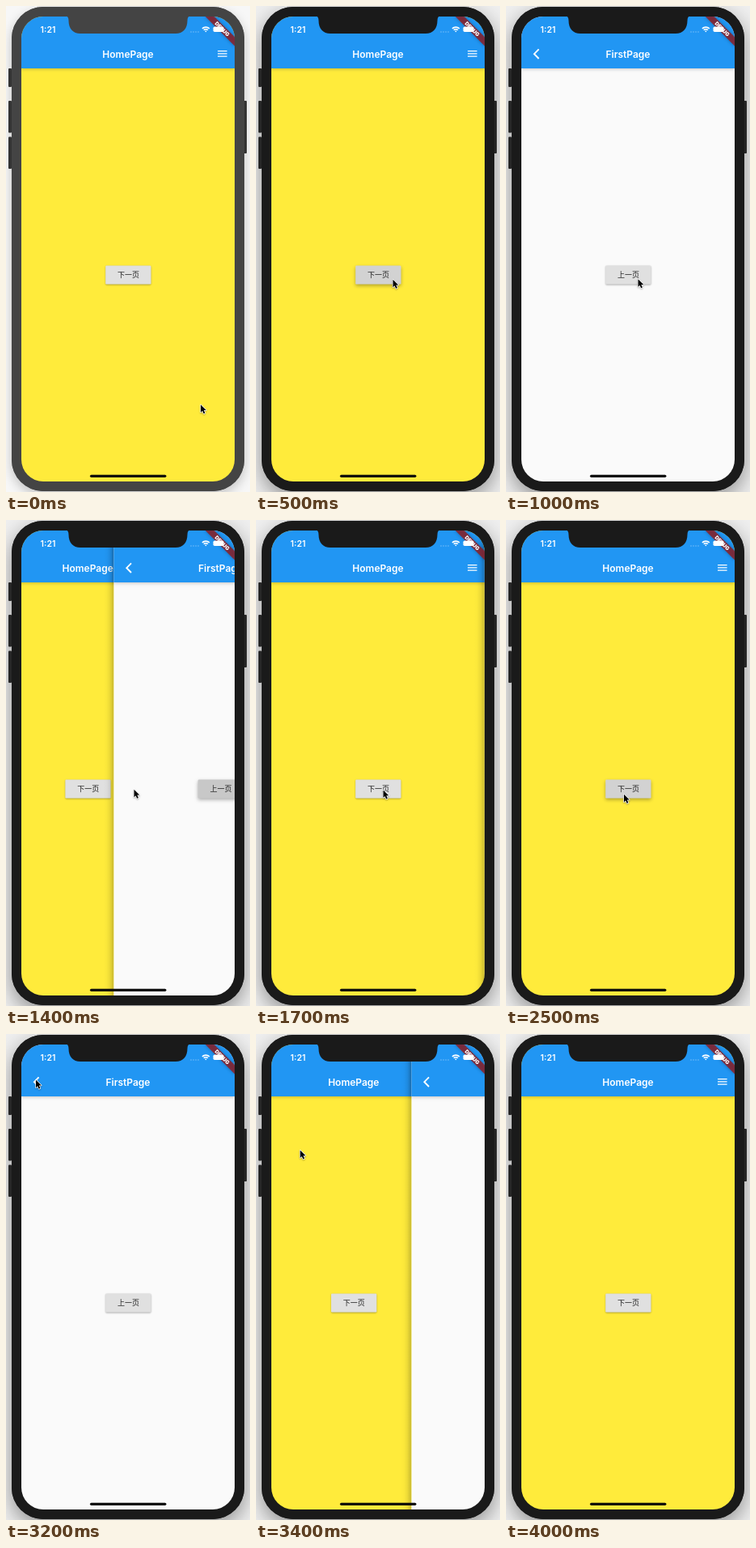
These frames come from a looping animation (302 px wide and 600 px high, 4.1 s). An HTML page with a canvas:

```html
<!DOCTYPE html>
<html lang="zh">
<head>
<meta charset="utf-8">
<style>
  html, body { margin: 0; width: 302px; height: 600px; overflow: hidden; }
  canvas { display: block; }
</style>
</head>
<body>
<canvas id="stage" width="302" height="600"></canvas>
<script>
const g = document.getElementById('stage').getContext('2d');
const LOOP = 4100, STEP = 100, SLIDE = 400;
const SCREEN = { x: 19, y: 13, w: 264, h: 574, r: 27 };
const UI = 'Inter, sans-serif', CJK = '"Noto Sans CJK SC", "Noto Sans CJK", sans-serif';

// Cursor waypoints: time, x, y
const CURSOR = [
  [0, 241, 492.3], [100, 236, 478], [350, 169.5, 337.8], [600, 169.5, 337.8],
  [900, 163.5, 337.3], [1200, 163.5, 337.3], [1400, 158.5, 332.8], [1700, 157.5, 333.5],
  [2200, 146, 338.8], [2700, 146, 338.8], [3100, 37, 56.8], [3300, 37, 56.8],
  [3700, 150, 612]
];
// Start of each slide and whether it opens the second page
const SLIDES = [[560, true], [1331, false], [2535, true], [3280, false]];

const easeOut = p => 1 - (1 - p) ** 3;
const between = (t, a, b) => t >= a && t < b;

function cursorAt(t) {
  const i = CURSOR.findIndex(k => k[0] > t);
  if (i < 0) return null;
  const [t0, x0, y0] = CURSOR[i - 1], [t1, x1, y1] = CURSOR[i];
  const p = (t - t0) / (t1 - t0), e = p * p * (3 - 2 * p);
  return [x0 + (x1 - x0) * e, y0 + (y1 - y0) * e];
}

function pageShown(t) {
  let shown = 0;
  for (const [start, opens] of SLIDES) {
    if (t < start) break;
    const e = easeOut(Math.min(1, (t - start) / SLIDE));
    shown = opens ? e : 1 - e;
  }
  return shown;
}

function box(x, y, w, h, r, color) {
  g.fillStyle = color;
  g.beginPath();
  g.roundRect(x, y, w, h, r);
  g.fill();
}

function shadow(color, blur, dy, draw) {
  g.save();
  g.shadowColor = color;
  g.shadowBlur = blur;
  g.shadowOffsetY = dy;
  draw();
  g.restore();
}

function label(text, x, y, font, color = '#fff') {
  g.font = font;
  g.fillStyle = color;
  g.textAlign = 'center';
  g.fillText(text, x, y);
}

function line(points, width) {
  g.strokeStyle = '#fff';
  g.lineWidth = width;
  g.beginPath();
  points.forEach(([x, y]) => g.lineTo(x, y));
  g.stroke();
}

function page(color, title, caption, pressed) {
  g.fillStyle = color;
  g.fillRect(SCREEN.x, SCREEN.y, SCREEN.w, SCREEN.h);
  shadow('rgba(0,0,0,.22)', 4, 1, () => box(19, 13, 264, 64, 0, '#2196f3'));
  label(title, 151, 63.5, '600 12px ' + UI);
  shadow('rgba(0,0,0,.3)', pressed ? 4 : 2, pressed ? 2 : .8,
    () => box(123.2, 320.4, 56.3, 23.2, 1.3, pressed || '#e0e0e0'));
  label(caption, 151.5, 335.3, '9px ' + CJK, '#212121');
}

function homePage(pressed) {
  page('#ffeb3b', 'HomePage', '下一页', pressed);
  for (const y of [55.7, 58.9, 62.1]) line([[262, y], [273.6, y]], 1.3);
}

function firstPage(pressed) {
  page('#fafafa', 'FirstPage', '上一页', pressed);
  line([[40.6, 53.4], [34.9, 59.2], [40.6, 65]], 1.9);
}

function edgeShadow() {
  const fade = g.createLinearGradient(6, 0, 19, 0);
  [[0, 0], [.3, .016], [.6, .07], [1, .22]]
    .forEach(([at, alpha]) => fade.addColorStop(at, `rgba(0,0,0,${alpha})`));
  g.fillStyle = fade;
  g.fillRect(6, 13, 13, 574);
}

function shifted(dx, draw) {
  g.save();
  g.translate(dx, 0);
  draw();
  g.restore();
}

function banner() {
  g.save();
  g.translate(283, 13);
  g.rotate(Math.PI / 4);
  shadow('rgba(0,0,0,.5)', 4, 0, () => box(-25.5, 17.9, 51, 7.7, 0, 'rgba(183,28,28,.63)'));
  box(-25.5, 17.9, 51, 7.7, 0, 'rgba(120,30,40,.5)');
  label('DEBUG', 0, 24.1, '900 6.5px ' + UI);
  g.restore();
}

function statusBar() {
  label('1:21', 52, 33, '600 10.5px ' + UI);
  for (let i = 0; i < 4; i++) box(228 + i * 3, 31, 2, 2, 1, 'rgba(255,255,255,.22)');
  g.strokeStyle = '#fff';
  g.lineWidth = 1.6;
  for (const r of [1, 3.6, 6.2]) {
    g.beginPath();
    g.arc(247.3, 32.3, r, -2.36, -.78);
    g.stroke();
  }
  box(256.5, 25.5, 13, 6.5, 1.8, '#fff');
}

function phone(active) {
  g.fillStyle = active ? '#efefef' : '#f7f7f7';
  g.fillRect(0, 0, 302, 600);
  const body = active ? '#1a1a1a' : '#444';
  const side = active ? '#262626' : '#333';
  const shell = () => box(7, 1, 288, 598, SCREEN.r + 12, body);
  shadow(active ? 'rgba(0,0,0,.4)' : 'rgba(0,0,0,.22)', active ? 26 : 14, active ? 9 : 5, shell);
  for (const [x, y, h] of [[3, 77, 23], [3, 117, 39.5], [3, 161.5, 39.5], [294, 117, 65]])
    box(x, y, 4, h, 1, side);
  shell();
  return body;
}

function notch(color) {
  g.fillStyle = color;
  g.fill(new Path2D('M74 12Q77.5 13 77.5 18C77.5 28 83 34 92 34H210C219 34 224.5 28 224.5 18Q224.5 13 228 12Z'));
}

function pointer([x, y]) {
  g.save();
  g.translate(x, y);
  g.scale(.85, .85);
  const arrow = new Path2D('M0 0V11L2.5 8.8 4.3 13 6.3 12.1 4.5 8H8Z');
  g.strokeStyle = '#fff';
  g.lineWidth = 1.6;
  g.lineJoin = 'round';
  shadow('rgba(0,0,0,.3)', 2, 1, () => g.stroke(arrow));
  g.fillStyle = '#000';
  g.fill(arrow);
  g.restore();
}

function draw(t) {
  const body = phone(t >= 400);
  const shown = pageShown(t);

  g.save();
  g.beginPath();
  g.roundRect(SCREEN.x, SCREEN.y, SCREEN.w, SCREEN.h, SCREEN.r);
  g.clip();
  if (shown < 1) {
    const pressed = between(t, 450, 800) || between(t, 2400, 2800);
    shifted(-SCREEN.w / 3 * shown, () => homePage(pressed && '#d2d2d2'));
  }
  if (shown > 0) {
    shifted(SCREEN.w * (1 - shown), () => {
      if (shown < 1) edgeShadow();
      firstPage(between(t, 1200, 1700) && '#c8c8c8');
    });
  }
  banner();
  g.restore();

  statusBar();
  notch(body);
  box(104, 578.7, 94.4, 3.2, 1.6, '#0a0a0a');
  const tip = cursorAt(t);
  if (tip) pointer(tip);
}

function tick() {
  draw(Math.floor(performance.now() % LOOP / STEP) * STEP);
  requestAnimationFrame(tick);
}
tick();
</script>
</body>
</html>
```
